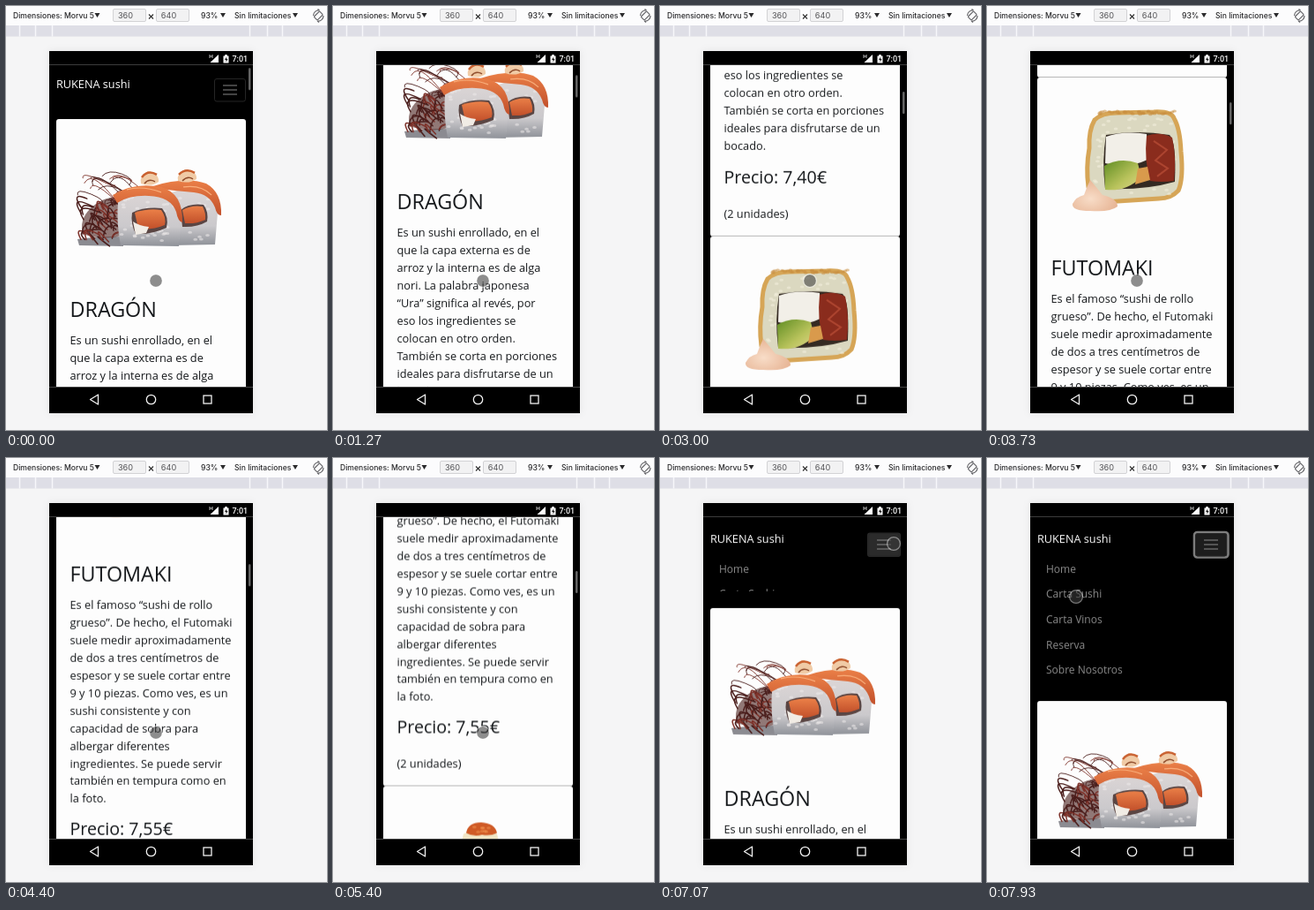
An HTML page that plays this animation: 364x480 px, repeating every 8000 ms.

```html
<!DOCTYPE html>
<html lang="es">
<head>
<meta charset="utf-8">
<title>Carta de sushi</title>
<style>
  html, body { margin: 0; width: 100%; height: 100%; overflow: hidden; background: #f5f5f6; }
  svg { display: block; width: 364px; height: 480px; }
  text { white-space: pre; }
  .bar { font: 500 8.6px Inter, sans-serif; fill: #2a2a2c; }
  .num { font: 9.2px Inter, sans-serif; fill: #555558; text-anchor: middle; }
  .phone { filter: drop-shadow(0 0 5px rgba(0, 0, 0, .07)); }
  .page text { font: 12.75px "Open Sans", sans-serif; fill: #14171a; }
  .page .title { font-size: 23.3px; }
  .page .price { font-size: 19.6px; }
  .page .brand { font-size: 12.7px; font-weight: 500; fill: #fff; }
  .page .link { font-size: 12px; fill: #8c8c8c; }
</style>
</head>
<body>
<svg viewBox="0 0 364 480" xmlns="http://www.w3.org/2000/svg">
  <defs>
    <clipPath id="screen"><rect x="49" y="67" width="231" height="364"/></clipPath>
    <linearGradient id="salmon" x2="0" y2="1">
      <stop stop-color="#ea7f47"/><stop offset="1" stop-color="#c2502b"/>
    </linearGradient>
    <linearGradient id="rice" x2="0" y2="1">
      <stop stop-color="#dcd6d6"/><stop offset=".65" stop-color="#cbc9cc"/><stop offset="1" stop-color="#8f9299"/>
    </linearGradient>
    <linearGradient id="avocado" x2="1" y2="1">
      <stop stop-color="#5f8d22"/><stop offset=".6" stop-color="#b9c35c"/><stop offset="1" stop-color="#e0d78c"/>
    </linearGradient>
    <radialGradient id="sauce" cx=".4" cy=".6" r=".7">
      <stop stop-color="#f8ddc8"/><stop offset="1" stop-color="#e5b08f"/>
    </radialGradient>
  </defs>

  <!-- toolbar -->
  <rect width="364" height="22" fill="#fcfcfd"/>
  <text class="bar" x="8" y="14">Dimensiones: Morvu 5</text>
  <text class="bar" x="221" y="14">93%</text>
  <text class="bar" x="259" y="14">Sin limitaciones</text>
  <path d="M100.500 8h6l-3 5zM243 8h6l-3 5zM325 8h6l-3 5z" fill="#2a2a2c"/>
  <g fill="#f2f2f3" stroke="#d2d2d5">
    <rect x="121.500" y="3.500" width="37" height="14" rx="1.500"/>
    <rect x="170.500" y="3.500" width="37" height="14" rx="1.500"/>
  </g>
  <text class="num" x="135.500" y="14">360</text>
  <text class="num" x="184.500" y="14">640</text>
  <path d="M162 9.500l5 5m0-5l-5 5" stroke="#333" stroke-width="1.200"/>
  <g fill="none" stroke="#66666a" stroke-width="1.200">
    <rect x="351.500" y="6.500" width="5.500" height="9" rx="1" transform="rotate(45 354.250 11)"/>
    <path d="M348.500 11a6 6 0 0 1 7-6M360 11a6 6 0 0 1-7 6M355.500 5l-2-1.500M353 17l2 1.500"/>
  </g>
  <rect y="22" width="364" height="12.500" fill="#dedee6"/>
  <path d="M15.500 22v12.500M33.500 22v12.500M52.500 22v12.500M276.500 22v12.500M296.500 22v12.500M313.500 22v12.500" stroke="#f7f7fa" stroke-width="1.500"/>

  <!-- phone -->
  <rect class="phone" x="49" y="51" width="231" height="410"/>
  <g class="page" clip-path="url(#screen)">
    <g id="scroll">
      <text class="brand" x="57" y="96.200">RUKENA sushi</text>
      <g id="menu"></g>
      <g id="cards"><rect x="49" y="112" width="231" height="1400"/></g>
      <rect id="ring" x="235" y="84" width="38.500" height="28.500" rx="3.500" fill="#1d1d1d" stroke="#7c7c7c" stroke-width="2.600"/>
      <rect id="tap" x="235" y="84.500" width="38" height="27.500" rx="3" fill="#2b2b2b"/>
      <rect x="236.500" y="85.500" width="35" height="25.500" rx="2.500" fill="none" stroke="#262626"/>
      <path d="M246 93h16M246 98h16M246 103h16" stroke="#8c8c8c" stroke-width="1.200"/>
    </g>
    <rect id="thumb" x="275" y="70" width="2.500" height="25" rx="1.200" fill="#7d7d7d" fill-opacity=".8"/>
  </g>

  <path d="M49 66.500h231" stroke="#3c3c3c"/>
  <path d="M49 431.500h231" stroke="#444"/>
  <path d="M241 55v9h-9.500z" fill="#fff"/>
  <path d="M231 55v4m3-4v4m-3-2h3" stroke="#ddd" stroke-width=".8"/>
  <path d="M246.500 56.500h1.800v-1.500h2.400v1.500h1.800v8h-6z" fill="#fff"/>
  <path d="M250.200 57.500l-2.200 3.500h1.500v2.500l2-3.500h-1.300z" fill="#111"/>
  <text x="256.500" y="63" font-family="Roboto, sans-serif" font-size="9" font-weight="500" fill="#fff">7:01</text>
  <g fill="none" stroke="#f2f2f2" stroke-width="1.300">
    <path d="M104.500 440v11l-9-5.500z" stroke-linejoin="round"/>
    <circle cx="164.500" cy="445.500" r="5.200"/>
    <rect x="224" y="441" width="9" height="9"/>
  </g>

  <g id="cursor">
    <circle r="7" fill="#3c3c3c" fill-opacity=".58"/>
    <circle r="7.400" fill="none" stroke="#fff" stroke-opacity=".45" stroke-width="1.300"/>
  </g>
</svg>
<script>
const LOOP = 8000;
const $ = id => document.getElementById(id);
const add = (id, html) => $(id).insertAdjacentHTML('beforeend', html);
const text = (y, s, cls = '', x = 72.5) => `<text class="${cls}" x="${x}" y="${y}">${s}</text>`;

let seed = 7;
const rand = (lo, hi) => {
  seed = (seed * 16807) % 2147483647;
  return lo + (hi - lo) * seed / 2147483647;
};
const repeat = (n, draw) => Array.from({ length: n }, (_, i) => draw(i)).join('');

// Dishes are drawn relative to the top left corner of their card.
function strands() {
  const color = i => i % 3 ? '#4a1d1b' : '#7d3028';
  const tangle = repeat(40, i => {
    const x = rand(28, 68), y = rand(96, 140);
    return `<path d="M${x} ${y}q${rand(-16, 4)} ${rand(-22, -8)} ${rand(4, 20)} ${rand(-12, 8)}" stroke="${color(i)}" stroke-width="1.5"/>`;
  });
  const curls = repeat(16, i => {
    const x = rand(22, 70), y = rand(64, 100);
    return `<path d="M${x} ${y}q${rand(-6, 10)} ${rand(-14, -4)} ${rand(12, 26)} ${rand(-4, 10)}t${rand(4, 16)} ${rand(4, 16)}" stroke="${color(i)}" stroke-width=".9"/>`;
  });
  return tangle + curls;
}

function grains(n, x, y, w, h, color) {
  return repeat(n, () =>
    `<ellipse cx="${rand(x, x + w)}" cy="${rand(y, y + h)}" rx="2.4" ry="1.5" fill="${color}" fill-opacity=".55"/>`);
}

const dragon = () => `
  <path d="M24 136q20-3 52-3v11l-50-1z" fill="#8b8b91"/>
  <path d="M30 130q-4-16 8-28 14-14 32-14l4 44q-22 6-44-2z" fill="#4a201d" fill-opacity=".6"/>
  <g fill="none" stroke-linecap="round">${strands()}</g>
  <path d="M126 86q14-9 32-4 22 5 25 24l-3 36-50 1z" fill="url(#rice)"/>
  ${grains(20, 132, 88, 42, 50, '#efebeb')}
  <path d="M141 103q10-8 26-6 6 8 4 19-12 7-28 6z" fill="#5a4543"/>
  <path d="M143 103q10-6 23-4 4 8 3 15-11 5-23 4z" fill="url(#salmon)"/>
  <path d="M70 92q14-14 40-10 29 3 32 28l-3 34-66-1q-5-24-3-51z" fill="url(#rice)"/>
  ${grains(44, 74, 88, 60, 51, '#efebeb')}
  <path d="M86 106q14-7 34-5 8 10 5 22-17 8-35 7-6-12-4-24z" fill="#5a4543"/>
  <path d="M89 106q14-5 30-3 6 8 4 17-15 6-30 4z" fill="url(#salmon)"/>
  <path d="M87 116q7 5 18 6l-3 7-12 2z" fill="#f1ece5"/>
  <path d="M110 76q36-11 60-3 18 10 17 36-5 0-7-9-6-15-24-17-24-2-46-5z" fill="url(#salmon)"/>
  <path d="M64 86q24-15 55-9 25 7 24 40-5-1-7-12-6-17-31-18-22-1-36 8z" fill="url(#salmon)"/>
  <path d="M80 80q18-5 39 3M144 77q20-3 32 9" fill="none" stroke="#f9ae7b" stroke-width="1.200"/>
  <path d="M96 73q-2-9 8-14 13 3 12 12-8 6-20 2zM138 70q-2-9 9-13 13 2 12 11-9 6-21 2z" fill="#f0cba6"/>
  <path d="M97 66q7-9 17-3M139 63q8-8 18-2" fill="none" stroke="#c9602f" stroke-width="2.500"/>
  <path d="M100 73q5-6 12-2M143 70q6-6 12-2" fill="none" stroke="#8d4a2a" stroke-width="1.500"/>`;

const futomaki = () => `
  <path d="M65 48q8-8 25-8l42-1q20-1 23 7 7 12 8 38 3 30-3 44-8 9-22 9l-62 4q-14-4-18-17-3-22 1-44-1-20 6-32z" fill="#dbd8c0" stroke="#d6a556" stroke-width="5"/>
  ${grains(40, 62, 38, 94, 4, '#c98e3f')}
  ${grains(70, 64, 46, 92, 86, '#f4f1df')}
  <path d="M78 65q35-6 72 0 8 8 6 53-35 10-79 8-4-32 1-61z" fill="#342a22"/>
  <path d="M78 67q20-7 46-3l1 29q-23 11-48 4z" fill="#f2efe8"/>
  <path d="M124 66q15-5 29 2 5 22 2 49-14 2-27 0-7-23-4-51z" fill="#8a2c1d"/>
  <path d="M132 72l15 10-13 12 14 9-12 9" fill="none" stroke="#ad4530" stroke-width="2"/>
  <path d="M76 100q18-10 38-3l4 16q-18 17-41 14z" fill="url(#avocado)"/>
  <path d="M114 103l11-2 3 15-17 5z" fill="#d99a4c"/>
  <path d="M60 116q7 8 14 17 17 4 17 13-9 7-31 5-21 0-20-8 4-8 13-10 3-9 7-17z" fill="url(#sauce)"/>`;

const nigiri = () => `
  <path d="M91 54q18-9 38 0 8 30 2 66-20 8-42 0-6-36 2-66z" fill="#f1e6c6"/>
  <path d="M94 53q2-12 17-12 16 1 18 12-8 4-17 2-9 3-18-2z" fill="#cf5a26"/>
  ${grains(8, 99, 44, 24, 8, '#f0914f')}`;

const dishes = [
  { top: 131, end: 664, art: dragon, title: 'DRAGÓN', price: '7,40€', body:
    'Es un sushi enrollado, en el|que la capa externa es de|arroz y la interna es de alga|nori. La palabra japonesa|“Ura” significa al revés, por|eso los ingredientes se|colocan en otro orden.|También se corta en porciones|ideales para disfrutarse de un|bocado.' },
  { top: 664, end: 1235, art: futomaki, title: 'FUTOMAKI', price: '7,55€', body:
    'Es el famoso “sushi de rollo|grueso”. De hecho, el Futomaki|suele medir aproximadamente|de dos a tres centímetros de|espesor y se suele cortar entre|9 y 10 piezas. Como ves, es un|sushi consistente y con|capacidad de sobra para|albergar diferentes|ingredientes. Se puede servir|también en tempura como en|la foto.' },
  { top: 1235, end: 1500, art: nigiri }
];

for (const { top, end, art, title, price, body } of dishes) {
  let html = `<rect x="57" y="${top}" width="215" height="${end - top}" rx="3" fill="#fdfdfd"/>
    <path d="M59 ${end}h211" stroke="#8a8a8a"/>
    <g transform="translate(57 ${top})">${art()}</g>`;
  if (title) {
    const lines = body.split('|');
    html += text(top + 223.7, title, 'title') +
      lines.map((s, i) => text(top + 255.6 + i * 19.9, s)).join('') +
      text(end - 59.5, `Precio: ${price}`, 'price') +
      text(end - 21.2, '(2 unidades)');
  }
  add('cards', html);
}

['Home', 'Carta Sushi', 'Carta Vinos', 'Reserva', 'Sobre Nosotros']
  .forEach((s, i) => add('menu', text(130 + i * 28.6, s, 'link', 67)));

// Each step is [time, value, easing to the next step].
function play(id, steps, style) {
  const frames = steps.map(([t, v, easing = 'linear']) => ({ offset: t / LOOP, easing, ...style(v) }));
  $(id).animate(frames, { duration: LOOP, iterations: Infinity });
}
const moveY = k => v => ({ transform: `translate(0px, ${v * k}px)` });
const moveXY = ([x, y]) => ({ transform: `translate(${x}px, ${y}px)` });
const opacity = v => ({ opacity: v });

const scroll = [
  [0, 3], [1270, 125], [3000, 403], [4400, 748, 'cubic-bezier(.3,.5,.6,1)'],
  [5130, 880], [5200, 880, 'ease-in'], [5400, 864, 'cubic-bezier(.3,.1,.6,.9)'],
  [6050, 45, 'ease-out'], [6350, 0], [LOOP, 0]
];
play('scroll', scroll, moveY(-1));
play('thumb', scroll, moveY(1 / 14.9));
play('thumb', [[0, 1], [6450, 1], [6750, 0], [LOOP, 0]], opacity);

play('cards', [[0, 0], [7005, 0, 'ease'], [7355, 144], [LOOP, 144]], moveY(1));
play('ring', [[0, 0], [7070, 0, 'ease-in'], [7220, 1], [LOOP, 1]], opacity);
play('tap', [[0, 0], [7000, 0], [7060, 1], [7150, 1], [7300, 0], [LOOP, 0]], opacity);
play('cursor', [
  [0, [170, 311]], [6130, [170, 311], 'ease-in'], [6450, [232, 190]],
  [6720, [271, 101], 'ease-out'], [6870, [265, 97]], [7200, [265, 97], 'ease-in-out'],
  [7920, [101, 157]], [LOOP, [101, 157]]
], moveXY);
</script>
</body>
</html>
```
